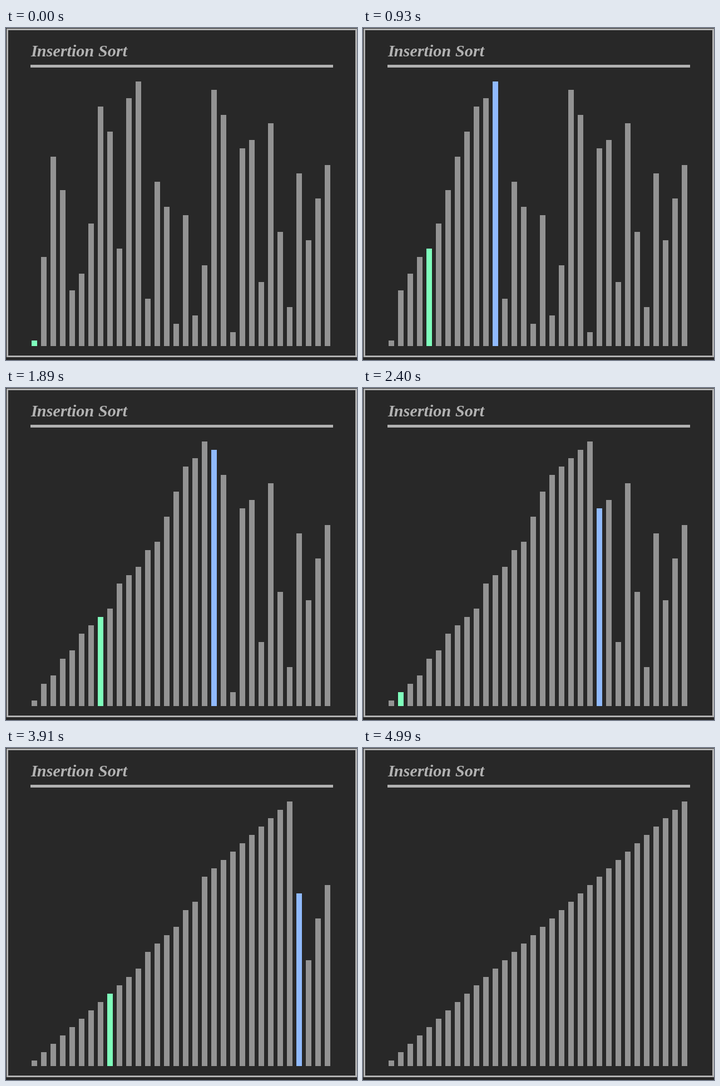
A matplotlib script that plays this animation: 631x596 px, repeating every 5650 ms.

```python
import numpy as np
import matplotlib.pyplot as plt
from matplotlib.animation import FuncAnimation
from matplotlib.patches import Rectangle

W, H, DPI = 631, 596, 100
PX = 72 / DPI
BACK, LIGHT, GRAY = "#282828", "#b2b2b2", "#939393"
GREEN, BLUE = "#7fffbc", "#90baff"
TICK, LOOP = 10, 5650

# Bars: unsorted ranks and their layout in pixels
RANKS = [0, 10, 22, 18, 6, 8, 14, 28, 25, 11, 29, 31, 5, 19, 16, 2,
         15, 3, 9, 30, 27, 1, 23, 24, 7, 26, 13, 4, 20, 12, 17, 21]
LEFT, PITCH, BAR, FLOOR = 46, 17, 10, 571
LOWEST, RISE = 10, 15

# The sort runs at a slightly uneven pace
TIMES = [0, 1890, 2400, 3910, 4990]
STEPS = [0, 110, 142, 229, 293]

fig = plt.figure(figsize=(W / DPI, H / DPI), dpi=DPI, facecolor=BACK)
ax = fig.add_axes([0, 0, 1, 1])
ax.set_xlim(0, W)
ax.set_ylim(H, 0)
ax.axis("off")


def box(x, y, w, h, color):
    return ax.add_patch(Rectangle((x, y), w, h, fc=color, lw=0,
                                  antialiased=False))


def sort_states():
    """Every comparison of an insertion sort that searches from the left."""
    values, states = list(RANKS), []
    for i in range(len(values)):
        for j in range(i + 1):
            states.append((list(values), i, j))
            if j == i or values[j] > values[i]:
                values.insert(j, values.pop(i))
                break
    return states + [(values, None, None)]


def shown_time(t):
    """Time of the latest repaint: every 30 ms, with one pause of 70 ms."""
    if t < 2470:
        return min(t - t % 30, 2400)
    return 2470 + (t - 2470) // 30 * 30


def update(frame):
    done = np.interp(shown_time(frame * TICK), TIMES, STEPS)
    values, i, j = states[int(np.ceil(done - 1e-6))]
    for k, (bar, value) in enumerate(zip(bars, values)):
        height = LOWEST + RISE * value
        bar.set_y(FLOOR - height)
        bar.set_height(height)
        bar.set_facecolor(GREEN if k == j else BLUE if k == i else GRAY)
    return bars


box(1, 1, 630, 590, LIGHT)
box(4, 4, 624, 584, BACK)
box(44, 66, 544, 5, LIGHT)
ax.text(44, 51, "Insertion Sort", color=LIGHT, family="Liberation Serif",
        weight="bold", style="italic", size=30.3 * PX, va="baseline")

states = sort_states()
bars = [box(LEFT + PITCH * k, FLOOR - LOWEST, BAR, LOWEST, GRAY)
        for k in range(len(RANKS))]

anim = FuncAnimation(fig, update, frames=LOOP // TICK, interval=TICK,
                     repeat=True, repeat_delay=0)
plt.show()
```
